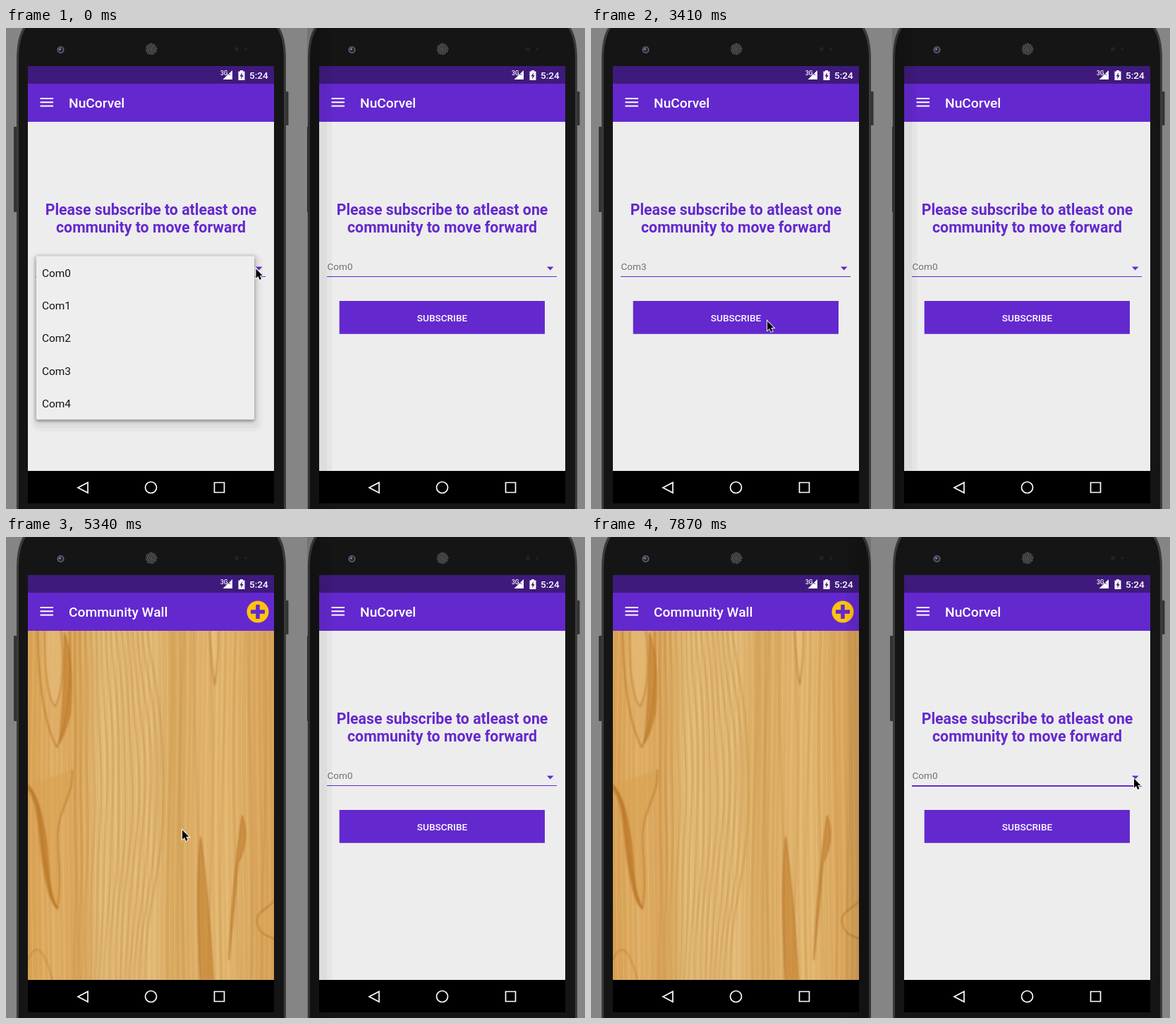
These frames come from a looping animation (821 by 682 pixels, 8000 ms). An HTML page:

```html
<!DOCTYPE html>
<html lang="en">
<head>
<meta charset="utf-8">
<title>Community subscription</title>
<style>
  html, body { margin: 0; width: 100%; height: 100%; overflow: hidden; background: #858585; }
  svg { display: block; }
  text { font-family: Roboto, sans-serif; }
  .bar { font-size: 19.2px; font-weight: 500; fill: #fff; }
  .head { font-size: 21.3px; font-weight: 700; fill: #6428cf; text-anchor: middle; }
  .small { font-size: 13.6px; }
  .choice { fill: #727272; }
  .medium { font-weight: 500; fill: #fff; }
  .item { font-size: 15.5px; fill: #111; }
  .line { fill: none; stroke: #fff; stroke-width: 1.7; }
</style>
</head>
<body>
<svg id="stage" width="821" height="682" viewBox="0 0 821 682"></svg>
<script>
const LOOP = 8000, PURPLE = '#6428cf';
const stage = document.getElementById('stage');
const repeat = (n, fn) => Array.from({ length: n }, (_, i) => fn(i)).join('');
const rect = (x, y, w, h, fill, extra = '') =>
  `<rect x="${x}" y="${y}" width="${w}" height="${h}" fill="${fill}" ${extra}/>`;
const text = (x, y, cls, str, extra = '') => `<text x="${x}" y="${y}" class="${cls}" ${extra}>${str}</text>`;

const toolbar = title => rect(31, 79, 349, 54, PURPLE) +
  repeat(3, i => rect(48.5, 99 + i * 5.3, 18.5, 2, '#fff')) + text(89, 113, 'bar', title);

// One wood fibre running from top to bottom along x(y)
function fibre(x, color, width, opacity) {
  const points = repeat(34, i => `${x(133 + i * 15).toFixed(1)},${133 + i * 15} `);
  return `<polyline points="${points}" fill="none" stroke="${color}" stroke-width="${width}" opacity="${opacity}"/>`;
}

function wood() {
  const tones = ['#d8a253', '#e0b067', '#dba75c', '#e5bf7c', '#e3bb78', '#e4bd7a',
    '#d9aa60', '#e0b36d', '#e3b972', '#dcab62', '#d7a257'];
  const streak = (d, fill = 'none', opacity = 0.6) =>
    `<path d="${d}" fill="${fill}" stroke="#b06a1c" stroke-width="2" opacity="${opacity}"/>`;
  return `<linearGradient id="tone">${tones.map((c, i) => `<stop offset="${i / 10}" stop-color="${c}"/>`).join('')}</linearGradient>
    <svg x="31" y="133" width="349" height="495" viewBox="31 133 349 495">` +
    rect(31, 133, 349, 495, 'url(#tone)') +
    repeat(150, i => {
      const x = 31 + i * 0.618034 % 1 * 349;
      return fibre(y => x + 2 * Math.sin(y / 110 + x / 40), i % 3 ? '#bd8740' : '#f2d49a', 1 + i % 2, 0.13);
    }) +
    '<g style="filter:blur(.8px)">' +
    repeat(15, i => fibre(y => 98 + i * 8 + i * Math.sin((y - 200) / 95) + Math.sin(y / 35 + i), '#b47a30', 1.8, 0.45)) +
    repeat(8, i => fibre(y => 232 + i * 19 + 4 * Math.sin(y / 120 + i * 1.7), '#b67b33', 3, 0.22)) +
    streak('M45 133C46 210 56 270 72 298C86 270 94 210 90 133', '#dfb068') +
    streak('M55 133C54 200 62 235 70 240C82 215 82 170 78 133', '#e6be7c', 0.5) +
    streak('M83 136Q97 180 91 250Q83 280 76 292Q84 210 83 136', '#c07a28') +
    streak('M31 352C50 372 48 410 53 445S64 518 73 527C82 470 66 430 78 395S95 355 94 330', '#d9a252') +
    streak('M31 356C48 382 46 420 52 460S64 520 73 527C58 500 62 460 56 425S46 370 31 352', '#b9701f') +
    streak('M289 133Q292 190 296 210Q302 170 301 133', '#ecc887', 0.5) +
    streak('M276 628Q268 500 276 425Q288 520 294 628', '#c17d2c') +
    streak('M335 395Q346 430 329 462Q322 540 316 600Q322 480 335 395', '#c17d2c') +
    streak('M382 514C372 528 354 530 356 546S370 566 382 570', '#dca75a') +
    streak('M31 600Q48 560 66 628', 'none', 0.4) + '</g></svg>';
}

// Window behind the other one shows the shadow bands of the front window
function phone(id, x, choice, extra = '') {
  return `<g id="${id}" transform="translate(${x})">` +
    [35, 28, 18, 8].map(s => rect(-16 - s, -40, 443 + 2 * s, 800, '#000', 'opacity=".035"')).join('') +
    rect(-16, 0, 443, 682, '#858585') +
    rect(11, 140, 5, 121, '#333', 'rx="1"') + rect(396, 90, 4.5, 48, '#333', 'rx="1"') +
    `<path d="M15 682V45C15 25 18 10 24 0H388C394 10 397 25 397 45V682Z" fill="#3b3b3b"/>
    <path d="M18 682V46C18 26 21 11 28 0H384C391 11 394 26 394 46V682Z" fill="#151515"/>
    <circle cx="77.5" cy="31" r="5" fill="#65656d"/><circle cx="77.5" cy="31" r="3.4" fill="#25253a"/>
    <circle cx="76.5" cy="30" r="1.5" fill="#8585ad"/>
    <circle cx="206" cy="30" r="8.5" fill="#2b2b2b"/>` +
    repeat(37, i => {
      const r = 1.3 * Math.sqrt(i), a = i * 2.4;
      return `<circle cx="${206 + r * Math.cos(a)}" cy="${30 + r * Math.sin(a)}" r=".75" fill="#777"/>`;
    }) +
    `<circle cx="327" cy="30" r="3" fill="#222"/><circle cx="340" cy="30" r="2" fill="#222"/>` +
    rect(31, 54, 349, 25, '#3e1a7c') + rect(31, 628, 349, 46, '#000') + rect(31, 133, 349, 495, '#ededed') +
    text(304, 67, 'medium', '3G', 'font-size="8.5"') +
    `<path d="M321 60V73H307.5Z" fill="#fff"/><path d="M314 63L318 67" stroke="#3e1a7c"/>
    <path d="M332 60H336V61.5H338.5V74H329.5V61.5H332Z" fill="#fff"/>
    <path d="M335 63L331.5 68.5H333.7L333 72.5L336.7 67H334.5Z" fill="#3e1a7c"/>` +
    text(345, 72, 'small medium', '5:24') + toolbar('NuCorvel') +
    text(205.5, 265, 'head', 'Please subscribe to atleast one') +
    text(205.5, 290, 'head', 'community to move forward') +
    text(42.5, 343, 'small choice', choice) +
    `<path d="M354 338.5H363.5L358.7 343.5Z" fill="${PURPLE}"/>` +
    rect(42, 352, 326, 1, PURPLE, 'class="underline"') +
    rect(59.7, 387, 291.3, 46.8, PURPLE, 'class="button"') +
    text(205.5, 416, 'small medium', 'SUBSCRIBE', 'text-anchor="middle"') +
    `<path class="line" d="M116 644.5V659L102 651.7ZM295.5 644.5H309.5V658.5H295.5Z"/>
    <circle class="line" cx="205.5" cy="651.5" r="8"/>` + extra + '</g>';
}

const menu = '<g id="menu">' +
  rect(34, 319, 331, 255, '#000', 'rx="14" opacity=".025"') +
  rect(38, 321, 322, 248, '#000', 'rx="9" opacity=".035"') +
  rect(42, 324, 311, 233, '#eee', 'rx="2" style="filter:drop-shadow(0 2px 2.5px #0007)"') +
  rect(42, 464, 311, 46.5, '#d8d8d8', 'id="tapped"') +
  repeat(5, i => text(50.3, 353.5 + i * 46.5, 'item', 'Com' + i)) + '</g>';

const wall = '<g id="wall">' + toolbar('Community Wall') +
  `<circle cx="357" cy="106" r="15.5" fill="#ffc40c"/>
  <path d="M347 106H367M357 96V116" stroke="${PURPLE}" stroke-width="5.5"/>` + wood() + '</g>';

stage.innerHTML = phone('right', 413, 'Com0') + phone('left', 0, 'Com0', menu + wall) +
  `<path id="cursor" d="M0 0V13.2L3 10.4L5.2 15.4L7.6 14.3L5.4 9.5H9.4Z" stroke="#fff" paint-order="stroke" stroke-width="1.8"/>`;

const $ = sel => stage.querySelector(sel);
const left = $('#left'), right = $('#right'), cursor = $('#cursor');
const menuBox = $('#menu'), tapped = $('#tapped'), wallPage = $('#wall');
const choice = $('#left .choice'), button = $('#left .button'), underline = $('#right .underline');
const show = (el, on) => el.setAttribute('visibility', on ? 'inherit' : 'hidden');

// Each move: first step, last step, number of steps, destination
const moves = [
  [150, 1040, 7, 174, 481], [1340, 1480, 2, 175, 490], [2080, 2970, 7, 250, 426],
  [3270, 3410, 2, 250, 415.5], [5790, 6240, 4, 778, 343], [6390, 6680, 3, 770, 342.5]
];

function progress(t, start, end, steps) {
  if (t < start) return 0;
  return Math.min(1, (Math.floor((t - start) / (end - start) * (steps - 1) + 0.02) + 1) / steps);
}

function pointer(t) {
  let x = 354.5, y = 341.5;
  for (const [start, end, steps, toX, toY] of moves) {
    const u = progress(t, start, end, steps), eased = u * u * (3 - 2 * u);
    x += (toX - x) * eased;
    y += (toY - y) * eased;
  }
  return [x, y];
}

let front = left;
function draw(now) {
  const t = now % LOOP;
  cursor.setAttribute('transform', `translate(${pointer(t)})`);

  show(menuBox, t < 2230);
  show(tapped, t >= 2080 && t < 2230);
  menuBox.setAttribute('transform', t < 150 ? 'translate(1 1) scale(.995)' : '');
  choice.textContent = t < 2230 ? 'Com0' : 'Com3';

  const lift = progress(t, 4010, 4310, 3);
  button.style.filter = lift ? `drop-shadow(0 ${1.5 * lift}px 1.5px rgba(0,0,0,${0.4 * lift}))` : '';

  const entering = t < 5340;
  show(wallPage, t >= 5200);
  wallPage.setAttribute('transform', entering ? 'translate(0 8)' : '');
  wallPage.setAttribute('opacity', entering ? 0.95 : 1);

  const top = t < 6970 ? left : right;
  if (top !== front) stage.insertBefore(front = top, cursor);
  underline.setAttribute('height', t < 7870 ? 1 : 2);
}

const began = performance.now();
(function tick() {
  draw(performance.now() - began);
  requestAnimationFrame(tick);
})();
</script>
</body>
</html>
```
